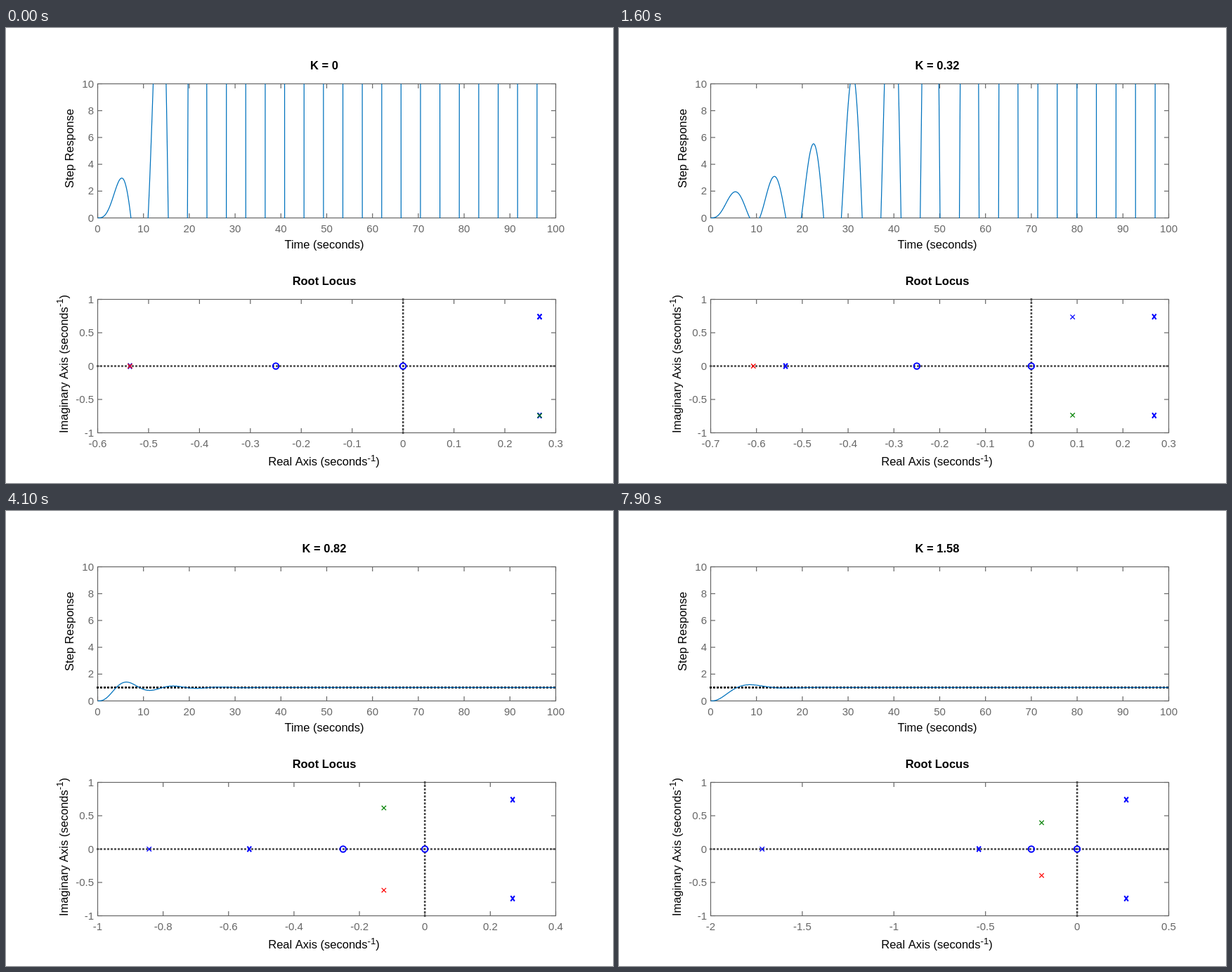
Write an HTML page with a canvas that moves like this. It is 864 by 648 pixels and loops after 8 s.

```html
<!DOCTYPE html>
<html lang="en">
<head>
<meta charset="utf-8">
<title>Step response and root locus</title>
<style>
  html, body { margin: 0; width: 100%; height: 100%; overflow: hidden; background: #fff; }
  canvas { display: block; width: 864px; height: 648px; }
</style>
</head>
<body>
<canvas id="stage" width="864" height="648"></canvas>
<script>
const ctx = document.getElementById('stage').getContext('2d');
const FONT = '"Liberation Sans", Arial, sans-serif';
const LEFT = 130.5, RIGHT = 782.5, MID = 453;
const TOP_BOX = { y0: 79.5, y1: 270.5, xMin: 0, xMax: 100, xStep: 10, yMin: 0, yMax: 10, yStep: 2 };
const LOCUS_Y = { y0: 386.5, y1: 576.5, yMin: -1, yMax: 1, yStep: 0.5 };
const GREY = '#666', BLUE = '#00f', GREEN = '#008000', RED = '#f00';

const px = (b, x) => LEFT + (x - b.xMin) / (b.xMax - b.xMin) * (RIGHT - LEFT);
const py = (b, y) => b.y1 - (y - b.yMin) / (b.yMax - b.yMin) * (b.y1 - b.y0);
const label = v => String(+v.toFixed(2) || 0);

// Poles of 3s^3 + 4K s^2 + (1 + K) s + 1
function findPoles(K) {
  let r = -3;
  for (let i = 0; i < 40; i++) {
    const f = ((3 * r + 4 * K) * r + 1 + K) * r + 1;
    r -= f / ((9 * r + 8 * K) * r + 1 + K);
  }
  const re = -(4 * K / 3 + r) / 2;
  const im = Math.sqrt(-1 / (3 * r) - re * re);
  return { r, re, im };
}

// Unit step response as a sum of its modes
function stepResponse(K, { r, re, im }) {
  const a = 1 / (r * (9 * r * r + 8 * K * r + 1 + K));
  const dRe = 9 * (re * re - im * im) + 8 * K * re + 1 + K;
  const dIm = 18 * re * im + 8 * K * im;
  const u = re * dRe - im * dIm, v = re * dIm + im * dRe;
  const amp = 2 / Math.hypot(u, v), phase = -Math.atan2(v, u);
  return t => 1 + a * Math.exp(r * t) + amp * Math.exp(re * t) * Math.cos(im * t + phase);
}

// Smallest round step that spans the data in at most ten intervals
function locusBox(lo, hi) {
  for (const step of [0.1, 0.2, 0.5]) {
    const first = Math.floor(lo / step + 1e-9 - 2e-9), last = Math.ceil(hi / step);
    if (last - first <= 10) {
      return { ...LOCUS_Y, xMin: first * step, xMax: last * step, xStep: step };
    }
  }
}

function line(x0, y0, x1, y1) {
  ctx.beginPath();
  ctx.moveTo(x0, y0);
  ctx.lineTo(x1, y1);
  ctx.stroke();
}

function dotted(x0, y0, x1, y1, color) {
  ctx.strokeStyle = color;
  ctx.lineWidth = 2.6;
  ctx.setLineDash([3, 2]);
  line(x0, y0, x1, y1);
  ctx.setLineDash([]);
}

function text(str, x, y, size, color, align = 'center', weight = 'normal') {
  ctx.font = `${weight} ${size}px ${FONT}`;
  ctx.textAlign = align;
  ctx.fillStyle = color;
  ctx.fillText(str, x, y);
}

function unitLabel(name, x, y) {
  const parts = [[name + ' (seconds', 16.5, 0], ['-1', 13.2, -6.5], [')', 16.5, 0]];
  const widths = parts.map(([s, size]) => {
    ctx.font = `${size}px ${FONT}`;
    return ctx.measureText(s).width;
  });
  x -= widths.reduce((a, b) => a + b) / 2;
  parts.forEach(([s, size, dy], i) => {
    text(s, x, y + dy, size, '#000', 'left');
    x += widths[i];
  });
}

function upright(x, y, draw) {
  ctx.save();
  ctx.translate(x, y);
  ctx.rotate(-Math.PI / 2);
  draw();
  ctx.restore();
}

function axes(b) {
  const tick = 6.5;
  ctx.strokeStyle = GREY;
  ctx.lineWidth = 1.2;
  ctx.strokeRect(LEFT, b.y0, RIGHT - LEFT, b.y1 - b.y0);
  const nx = Math.round((b.xMax - b.xMin) / b.xStep);
  for (let i = 0; i <= nx; i++) {
    const v = b.xMin + i * b.xStep, x = px(b, v);
    line(x, b.y1, x, b.y1 - tick);
    line(x, b.y0, x, b.y0 + tick);
    text(label(v), x, b.y1 + 20, 15, GREY);
  }
  const ny = Math.round((b.yMax - b.yMin) / b.yStep);
  for (let i = 0; i <= ny; i++) {
    const v = b.yMin + i * b.yStep, y = py(b, v);
    line(LEFT, y, LEFT + tick, y);
    line(RIGHT, y, RIGHT - tick, y);
    text(label(v), 125, y + 5, 15, GREY, 'right');
  }
}

function cross(x, y, w, h, width, color) {
  ctx.strokeStyle = color;
  ctx.lineWidth = width;
  line(x - w, y - h, x + w, y + h);
  line(x - w, y + h, x + w, y - h);
}

function ring(x, y) {
  ctx.strokeStyle = BLUE;
  ctx.lineWidth = 2;
  ctx.beginPath();
  ctx.arc(x, y, 4.2, 0, 7);
  ctx.stroke();
}

function drawResponse(K, poles) {
  const b = TOP_BOX, y = stepResponse(K, poles);
  text('K = ' + label(K), MID, 58.5, 16.5, '#000', 'center', 'bold');
  axes(b);
  if (poles.re < -1e-9) {
    dotted(LEFT - 1.5, py(b, 1), RIGHT + 1.5, py(b, 1), '#000');
  }
  ctx.save();
  ctx.beginPath();
  ctx.rect(LEFT, b.y0, RIGHT - LEFT, b.y1 - b.y0 + 0.5);
  ctx.clip();
  ctx.strokeStyle = '#0072bd';
  ctx.lineWidth = 1.25;
  ctx.lineJoin = 'round';
  ctx.beginPath();
  for (let i = 0; i <= 5000; i++) {
    const t = i / 50;
    ctx.lineTo(px(b, t), py(b, Math.max(-5, Math.min(15, y(t)))));
  }
  ctx.stroke();
  ctx.restore();
  text('Time (seconds)', MID, 313.5, 16.5, '#000');
  upright(95.5, 171.5, () => text('Step Response', 0, 0, 16.5, '#000'));
}

const open = findPoles(0);

function drawLocus(poles) {
  const b = locusBox(poles.r, open.re);
  const zeroX = px(b, 0), zeroY = py(b, 0);
  text('Root Locus', MID, 366, 16.5, '#000', 'center', 'bold');
  axes(b);
  dotted(LEFT - 1.5, zeroY, RIGHT + 1.5, zeroY, '#4d4d4d');
  dotted(zeroX, b.y0 - 1.5, zeroX, b.y1 + 1.5, '#4d4d4d');

  const marks = p => [[p.r, 0], [p.re, p.im], [p.re, -p.im]];
  for (const [x, y] of marks(open)) cross(px(b, x), py(b, y), 2.8, 3.8, 2, BLUE);
  ring(zeroX, zeroY);
  ring(px(b, -0.25), zeroY);

  // The largest root takes the first colour
  const realFirst = -poles.r > Math.hypot(poles.re, poles.im);
  const colors = realFirst ? [BLUE, GREEN, RED] : [RED, BLUE, GREEN];
  marks(poles).forEach(([x, y], i) => cross(px(b, x), py(b, y), 3.2, 3.2, 1.25, colors[i]));

  unitLabel('Real Axis', MID - 0.5, 623);
  upright(87.5, 478.5, () => unitLabel('Imaginary Axis', 0, 0));
}

let shown = -1;
function render(now) {
  const step = Math.floor((now - start) % 8000 / 100);
  if (step !== shown && step >= 0) {
    shown = step;
    const K = step / 50, poles = findPoles(K);
    ctx.fillStyle = '#fff';
    ctx.fillRect(0, 0, 864, 648);
    drawResponse(K, poles);
    drawLocus(poles);
  }
  requestAnimationFrame(render);
}
const start = performance.now();
render(start);
</script>
</body>
</html>
```
